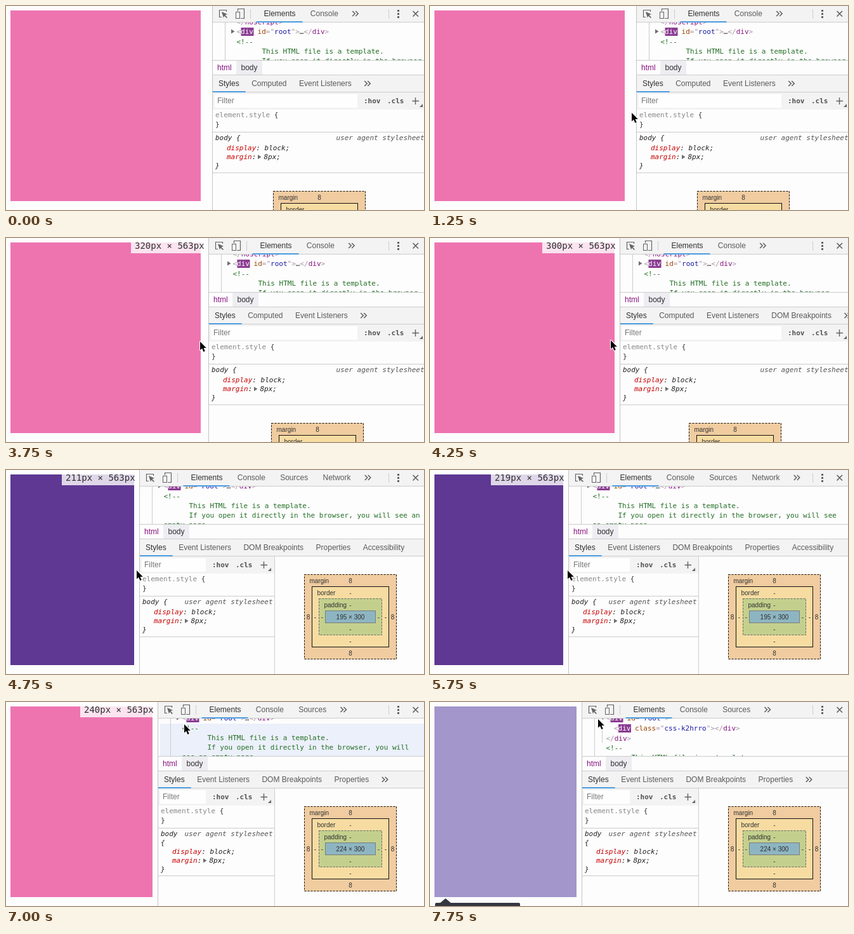
An HTML page with a canvas that plays this animation: 659 px wide and 321 px high, repeating every 8000 ms.

```html
<!DOCTYPE html>
<html lang="en">
<head>
<meta charset="utf-8">
<title>Resizing the inspector panel</title>
<style>
html, body { margin: 0; width: 100%; height: 100%; overflow: hidden; background: #fdfdfd; }
canvas { display: block; }
</style>
</head>
<body>
<canvas id="stage" width="659" height="321"></canvas>
<script>
const W = 659, H = 321, LOOP = 8000;
const ctx = document.getElementById('stage').getContext('2d');

const SANS = '"Liberation Sans", Arial, sans-serif';
const MONO = '"DejaVu Sans Mono", monospace';
const UI = `12px ${SANS}`, SMALL = `10px ${SANS}`;
const CODE = `11px ${MONO}`, BOLD = `bold 11px ${MONO}`, SLANT = `italic 11px ${MONO}`;

const PAPER = '#fdfdfd', BAR = '#f3f3f3', LINE = '#cccccc';
const INK = '#303030', DIM = '#5a5a5a', ICON = '#636363';
const TAG = '#881280', PUNCT = '#a894a6', ATTR = '#994500', VALUE = '#1a1aa6', COMMENT = '#236e25';

// start time, panel edge, pointer x, pointer y
const steps = [
  [0, 325, -50, 0], [250, 325, 277, 176], [500, 325, 278, 178], [750, 325, 319, 166],
  [1000, 325, 319, 167], [1250, 325, 318, 168], [3000, 325, 321, 165], [3250, 325, 320, 164],
  [3750, 319, 306, 163], [4000, 312, 298, 162], [4250, 299, 285, 161], [4500, 229, 215, 159],
  [4750, 210, 206, 158], [5750, 218, 217, 158], [6000, 226, 229, 158], [6250, 239, 235, 158],
  [6500, 239, 300, 88], [6750, 239, 317, 65], [7000, 239, 281, 35], [7250, 239, 270, 24],
  [7500, 239, 265, 27]
];

function rect(x, y, w, h, fill) {
  ctx.fillStyle = fill;
  ctx.fillRect(x, y, w, h);
}

function frame(x, y, w, h, color, dash = []) {
  ctx.strokeStyle = color;
  ctx.lineWidth = 1;
  ctx.setLineDash(dash);
  ctx.strokeRect(x + 0.5, y + 0.5, w - 1, h - 1);
  ctx.setLineDash([]);
}

function text(str, x, y, font, color, align = 'left') {
  ctx.font = font;
  ctx.fillStyle = color;
  ctx.textAlign = align;
  ctx.fillText(str, x, y);
}

function width(str, font) {
  ctx.font = font;
  return ctx.measureText(str).width;
}

// pairs of text and colour set one after the other
function run(x, y, parts, font = CODE) {
  for (const [str, color] of parts) {
    text(str, x, y, font, color);
    x += width(str, font);
  }
}

function shape(points, fill) {
  ctx.beginPath();
  points.forEach(([x, y]) => ctx.lineTo(x, y));
  ctx.closePath();
  ctx.fillStyle = fill;
  ctx.fill();
}

function stroke(lines, color, weight) {
  ctx.strokeStyle = color;
  ctx.lineWidth = weight;
  ctx.beginPath();
  for (const line of lines) line.forEach(([x, y], i) => i ? ctx.lineTo(x, y) : ctx.moveTo(x, y));
  ctx.stroke();
}

function chevrons(x, y) {
  const one = a => [[a, y - 4], [a + 4, y], [a, y + 4]];
  stroke([one(x), one(x + 5)], ICON, 1.6);
}

const caretRight = (x, y) => shape([[x, y - 3.5], [x + 5.5, y], [x, y + 3.5]], '#6e6e6e');
const caretDown = (x, y) => shape([[x, y - 3], [x + 7, y - 3], [x + 3.5, y + 3]], '#6e6e6e');

function page(s) {
  const w = Math.min(300, s.edge - 15);
  rect(0, 0, W, H, PAPER);
  rect(7, 7, w, 300, s.picked ? '#a296cb' : s.edge <= 218 ? '#5e3892' : '#ee74b0');
  if (s.sizing) {
    rect(s.edge - 122, 0, 122, 24, 'rgba(255,255,255,0.8)');
    text(`${s.edge + 1}px × 563px`, s.edge - 116, 17, `14px ${MONO}`, '#303030');
  }
  if (s.picked) {
    shape([[15, 317], [24.5, 309], [34, 317]], '#343740');
    ctx.beginPath();
    ctx.roundRect(8, 316, 134, 20, 2);
    ctx.fill();
  }
}

function toolbar(d) {
  rect(d, 0, W - d, 25, BAR);
  rect(d, 25, W - d, 1, LINE);

  stroke([[[d + 15, 17.5], [d + 11.5, 17.5], [d + 11.5, 6.5], [d + 22.5, 6.5], [d + 22.5, 9]]], ICON, 1.2);
  shape([[d + 15, 9], [d + 24, 13], [d + 20.5, 14.3], [d + 24, 18], [d + 22.8, 19], [d + 19.3, 15.5], [d + 18, 18.5]], ICON);
  stroke([[[d + 40.5, 8], [d + 40.5, 4.5], [d + 50.5, 4.5], [d + 50.5, 19.5], [d + 45, 19.5]]], ICON, 1.2);
  frame(d + 37, 9, 7, 11, ICON);
  rect(d + 60, 5, 1, 15, LINE);

  let x = d + 81.5;
  for (const [i, name] of ['Elements', 'Console', 'Sources', 'Network'].entries()) {
    const w = width(name, UI), next = x + w + 23.3;
    if (next > 580) break;
    text(name, x, 16, UI, i ? DIM : INK);
    if (!i) rect(x - 12, 24, w + 23, 2, '#4b9be0');
    x = next;
  }
  chevrons(x - 1, 12);

  rect(603, 5, 1, 15, LINE);
  for (const y of [6, 11, 16]) rect(617, y, 3, 3, ICON);
  stroke([[[641.5, 8], [650, 16.5]], [[650, 8], [641.5, 16.5]]], ICON, 1.7);
}

function openTag(x, y, attr, value, tail) {
  rect(x + 7, y - 10, 20, 13, '#8a3c92');
  run(x, y, [['<', PUNCT], ['div', '#fff'], [' ', TAG], [attr, ATTR], ['="', PUNCT],
    [value, VALUE], ['">', PUNCT], ...tail]);
}

const closeTag = name => [['</', PUNCT], [name, TAG], ['>', PUNCT]];

function comment(x, y) {
  text('<!--', x, y, CODE, COMMENT);
  text('This HTML file is a template.', x + 40, y + 15, CODE, COMMENT);
  const words = 'If you open it directly in the browser, you will see an empty page.'.split(' ');
  let line = '', left = x + 40, row = y + 30;
  for (const word of words) {
    const longer = line ? `${line} ${word}` : word;
    if (left + width(longer.replace(/,$/, ''), CODE) > W) {
      text(line, left, row, CODE, COMMENT);
      line = word;
      left = x;
      row += 15;
    } else line = longer;
  }
  text(line, left, row, CODE, COMMENT);
}

function tree(s) {
  const d = s.edge, x = d + 38.5;
  ctx.save();
  ctx.beginPath();
  ctx.rect(d, 26, W - d, 59);
  ctx.clip();
  rect(d, 26, W - d, 59, PAPER);
  if (s.hover) rect(d + 4, s.hover[0], W, s.hover[1], '#ebf0fa');
  rect(d + 20, 26, 1, 59, LINE);

  const top = s.narrow ? 44 : 29;
  if (s.narrow) run(x, 29, closeTag('noscript'));
  if (s.open) {
    caretDown(d + 30, top - 4);
    openTag(x, top, 'id', 'root', []);
    openTag(d + 51, top + 16, 'class', 'css-k2hrro', closeTag('div'));
    rect(d + 32, 34, 1, 30, LINE);
    run(x, top + 32, closeTag('div'));
    comment(x, top + 47);
  } else {
    caretRight(d + 30, top - 4);
    openTag(x, top, 'id', 'root', [['…', INK], ...closeTag('div')]);
    comment(x, top + 16);
  }
  ctx.restore();
}

function crumbs(d) {
  rect(d, 85, W - d, 1, LINE);
  rect(d + 38, 86, 41, 22, '#eeeef2');
  text('html', d + 8, 101, UI, TAG);
  text('body', d + 45.5, 101, UI, INK);
}

function sideTabs(s) {
  const d = s.edge;
  rect(d, 108, W - d, 27, BAR);
  rect(d, 108, W - d, 1, LINE);
  rect(d, 135, W - d, 1, LINE);
  const names = ['Styles', 'Event Listeners', 'DOM Breakpoints', 'Properties', 'Accessibility'];
  if (s.narrow) names.splice(1, 0, 'Computed');
  let x = d + 10;
  for (const [i, name] of names.entries()) {
    const w = width(name, UI), last = i === names.length - 1;
    if (x + w > (last ? 655 : 634)) {
      chevrons(x + 1, 122);
      break;
    }
    text(name, x, 126, UI, i ? DIM : INK);
    if (!i) rect(d + 1, 134, w + 19, 2, '#4b9be0');
    x += w + 19.5;
  }
}

function styles(s) {
  const d = s.edge, r = s.narrow ? W : 420, end = s.narrow ? W : 423;
  rect(d, 136, end - d, 27, BAR);
  rect(d + 4, 139, r - 105 - d - 4, 21, '#fefefe');
  text('Filter', d + 8, 153, UI, '#777');
  text(':hov', r - 95, 153, BOLD, '#505050');
  text('.cls', r - 58, 153, BOLD, '#505050');
  stroke([[[r - 18.5, 149.5], [r - 8, 149.5]], [[r - 13.5, 144], [r - 13.5, 155]]], ICON, 1.4);
  shape([[r - 2, 154], [r - 2, 159], [r - 7, 159]], ICON);

  const x = d + 5;
  run(x, 175, [['element.style', '#888'], [' {', INK]]);
  text('}', x, 190, CODE, INK);
  rect(d, 198, end - d, 1, LINE);

  const ua = r - 138.5, wraps = x + width('body {', SLANT) > ua;
  const drop = wraps ? 12 : 0;
  text(wraps ? 'body' : 'body {', x, 211, SLANT, '#222');
  if (wraps) text('{', x, 225, SLANT, '#222');
  text('user agent stylesheet', ua, 211, SLANT, '#555');
  run(d + 23, 227 + drop, [['display', '#c80000'], [': block;', '#222']], SLANT);
  run(d + 23, 241 + drop, [['margin', '#c80000'], [':', '#222']], SLANT);
  caretRight(d + 72, 237.5 + drop);
  text('8px;', d + 81.5, 241 + drop, SLANT, '#222');
  text('}', x, 255 + drop, SLANT, '#222');
  rect(d, wraps ? 273 : 262, end - d, 1, LINE);
  if (!s.narrow) rect(423, 136, 1, H - 136, LINE);
}

function boxModel(s) {
  const c = s.narrow ? (s.edge + 663) / 2 : 543, y = s.narrow ? 291 : 164;
  const layers = [
    ['margin', 73, 0, 134, '#f0cca0', '#111', [3, 2], '8'],
    ['border', 61, 19, 96, '#f7dca2', '#111', [], '-'],
    ['padding', 50, 38, 58, '#c3d08d', '#666', [3, 2], '-']
  ];
  for (const [name, half, top, h, fill, edge, dash, size] of layers) {
    rect(c - half, y + top, half * 2, h, fill);
    frame(c - half, y + top, half * 2, h, edge, dash);
    text(name, c - half + 8.5, y + top + 13.5, SMALL, INK);
    const mid = name === 'margin' ? 6.5 : 5.5;
    text(size, c, y + top + 13.5, SMALL, INK, 'center');
    text(size, c, y + top + h - 6, SMALL, INK, 'center');
    text(size, c - half + mid, y + 71, SMALL, INK, 'center');
    text(size, c + half - mid, y + 71, SMALL, INK, 'center');
  }
  rect(c - 40, y + 57, 80, 20, '#8db5c1');
  frame(c - 40, y + 57, 80, 20, '#7d7d7d');
  text(`${s.content} × 300`, c, y + 71, SMALL, INK, 'center');
}

function pointer(x, y) {
  ctx.save();
  ctx.translate(x, y);
  ctx.lineJoin = 'round';
  ctx.beginPath();
  for (const [a, b] of [[0, 0], [0, 13.5], [3.1, 10.7], [5.4, 16], [7.8, 15], [5.5, 9.9], [9.8, 9.9]]) ctx.lineTo(a, b);
  ctx.closePath();
  ctx.strokeStyle = '#fff';
  ctx.lineWidth = 2;
  ctx.stroke();
  ctx.fillStyle = '#000';
  ctx.fill();
  ctx.restore();
}

function stateAt(t) {
  const [, edge, px, py] = steps.findLast(step => step[0] <= t);
  return {
    edge, px, py,
    narrow: edge > 270,
    sizing: t >= 3750 && t < 7250,
    picked: t >= 7250,
    open: t >= 7750,
    hover: t >= 6750 && t < 7250 ? [34, 51] : t >= 7250 && t < 7500 ? [26, 8] : null,
    // the box model refreshes only after the drag rests
    content: t < 4750 ? Math.min(300, edge - 15) : t < 6500 ? 195 : 224
  };
}

function draw(now) {
  const s = stateAt(now % LOOP), d = s.edge;
  page(s);
  rect(d, 0, W - d, H, PAPER);
  tree(s);
  toolbar(d);
  crumbs(d);
  sideTabs(s);
  styles(s);
  boxModel(s);
  rect(d, 0, 1, H, '#c4c4c4');
  pointer(s.px, s.py);
}

const start = performance.now();
function tick() {
  draw(performance.now() - start);
  requestAnimationFrame(tick);
}
tick();
</script>
</body>
</html>
```
